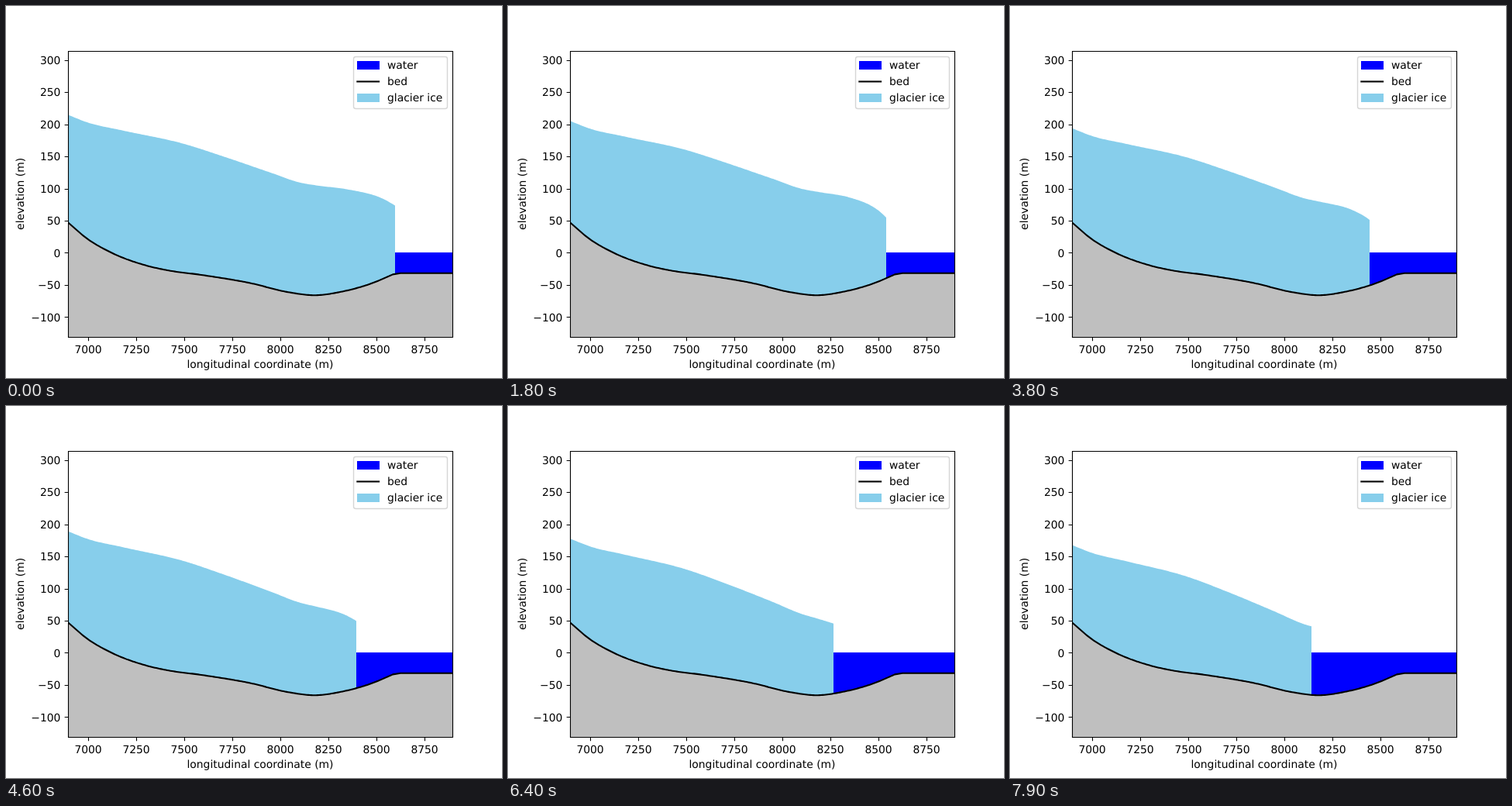
An HTML page for the animation above (8000 ms loop, 640 by 480 pixels).

```html
<!DOCTYPE html>
<html lang="en">
<head>
<meta charset="utf-8">
<title>Glacier retreat</title>
<style>
  html, body { margin: 0; width: 100%; height: 100%; overflow: hidden; background: #fff; }
  svg { display: block; width: 640px; height: 480px; }
  text { font: 13.89px "DejaVu Sans", sans-serif; text-rendering: geometricPrecision; }
  .mid { text-anchor: middle; }
  .end { text-anchor: end; }
  .ice { fill: #87ceeb; }
  .water { fill: #00f; }
  .land { fill: #bfbfbf; }
  .bed { fill: none; stroke: #000; stroke-width: 2.08; stroke-linejoin: round; stroke-linecap: square; }
  .axis { fill: none; stroke: #000; stroke-width: 1.11; }
  .box { fill: #fff; stroke: #ccc; stroke-width: 1.39; opacity: .8; }
</style>
</head>
<body>
<svg viewBox="0 0 640 480">
  <clipPath id="plot"><rect x="80" y="57.6" width="496" height="369.6"/></clipPath>
  <g clip-path="url(#plot)">
    <path id="ice" class="ice"/>
    <rect id="water" class="water" y="318" height="70"/>
    <path id="land" class="land"/>
    <path id="bed" class="bed"/>
  </g>
  <path id="axes" class="axis"/>
  <g id="labels"></g>
  <text class="mid" x="328" y="467">longitudinal coordinate (m)</text>
  <text class="mid" transform="translate(23 242.4) rotate(-90)">elevation (m)</text>
  <rect class="box" x="448.5" y="65.5" width="121" height="67" rx="2.8"/>
  <rect class="water" x="453" y="71" width="29" height="11"/>
  <path class="bed" d="M453.3 97.5H481.1"/>
  <rect class="ice" x="453" y="113" width="29" height="11"/>
  <text x="492" y="81">water</text>
  <text x="492" y="102">bed</text>
  <text x="492" y="123">glacier ice</text>
</svg>
<script>
const $ = id => document.getElementById(id);
const LOOP = 8000, STEP = 100;
const LEFT = 80, RIGHT = 576;

// Smooth function through a few [x, y] points
function spline(points) {
  const n = points.length - 1;
  const gap = i => points[i + 1][0] - points[i][0];
  const rise = i => (points[i + 1][1] - points[i][1]) / gap(i);
  const slope = i =>
    i === 0 ? rise(0) :
    i === n ? rise(n - 1) :
    (rise(i - 1) * gap(i) + rise(i) * gap(i - 1)) / (gap(i - 1) + gap(i));
  return x => {
    let i = 0;
    while (i < n - 1 && x > points[i + 1][0]) i++;
    const h = gap(i), u = (x - points[i][0]) / h, v = 1 - u;
    return v * v * ((1 + 2 * u) * points[i][1] + u * h * slope(i)) +
           u * u * ((1 + 2 * v) * points[i + 1][1] - v * h * slope(i + 1));
  };
}

function trace(f, end) {
  let path = `M${LEFT} ${f(LEFT)}`;
  for (let x = LEFT + 2; x < end; x += 2) path += `L${x} ${f(x)}`;
  return path + `L${end} ${f(end)}`;
}

const firstSurface = spline([
  [80, 140.5], [106, 150.5], [150, 160.5], [230, 178], [280, 194], [340, 214.5],
  [380, 228], [402, 231.7], [440, 236.5], [490, 250.5], [502, 257.5]
]);

const bedrock = spline([
  [80, 279.2], [104, 299.7], [135, 317.8], [180, 334.6], [205, 340.4], [255, 347.4],
  [315, 357.5], [365, 369.4], [398, 373.2], [435, 368.2], [475, 356.7], [499, 346.4]
]);

// Retreat speeds up; u runs from 0 to 1
const front = u => Math.round(502 - 48 * u - 65 * u * u);

// Overall thinning, stronger downstream, plus a rounded calving edge
function surface(x, u) {
  const s = (x - LEFT) / 260;
  const thinning = 33 * u + 6 * u * u + s * s * (14 * u * u - 3 * u);
  const edge = 46 * Math.sqrt(u) * (1 - u) ** 1.3;
  return firstSurface(x) + thinning + edge * Math.exp((x - front(u)) / 26);
}

function draw(t) {
  const u = t / (LOOP - STEP), end = front(u);
  $("ice").setAttribute("d", trace(x => surface(x, u), end) + `V400H${LEFT}Z`);
  $("water").setAttribute("x", end);
  $("water").setAttribute("width", RIGHT - end);
}

function drawBed() {
  const line = trace(bedrock, 499) + "L509 344.7H577";
  $("bed").setAttribute("d", line);
  $("land").setAttribute("d", line + `V428H${LEFT}Z`);
}

function addLabel(anchor, x, y, value) {
  const el = document.createElementNS("http://www.w3.org/2000/svg", "text");
  el.setAttribute("class", anchor);
  el.setAttribute("x", x);
  el.setAttribute("y", y);
  el.textContent = String(value).replace("-", "\u2212");
  $("labels").append(el);
}

function drawAxes() {
  let path = "M80.5 58.5H576.5V427.5H80.5Z";
  for (let m = 7000; m <= 8750; m += 250) {
    const x = LEFT + (m - 6895) * .248;
    path += `M${Math.round(x) + .5} 427.5v4.86`;
    addLabel("mid", x, 448, m);
  }
  for (let m = -100; m <= 300; m += 50) {
    const y = 318.4 - m * .8288;
    path += `M80.5 ${Math.round(y) + .5}h-4.86`;
    addLabel("end", 70.4, Math.round(y + 5.3), m);
  }
  $("axes").setAttribute("d", path);
}

drawBed();
drawAxes();
draw(0);

const start = performance.now();
function tick() {
  const t = (performance.now() - start) % LOOP;
  draw(Math.floor(t / STEP) * STEP);
  requestAnimationFrame(tick);
}
requestAnimationFrame(tick);
</script>
</body>
</html>
```
